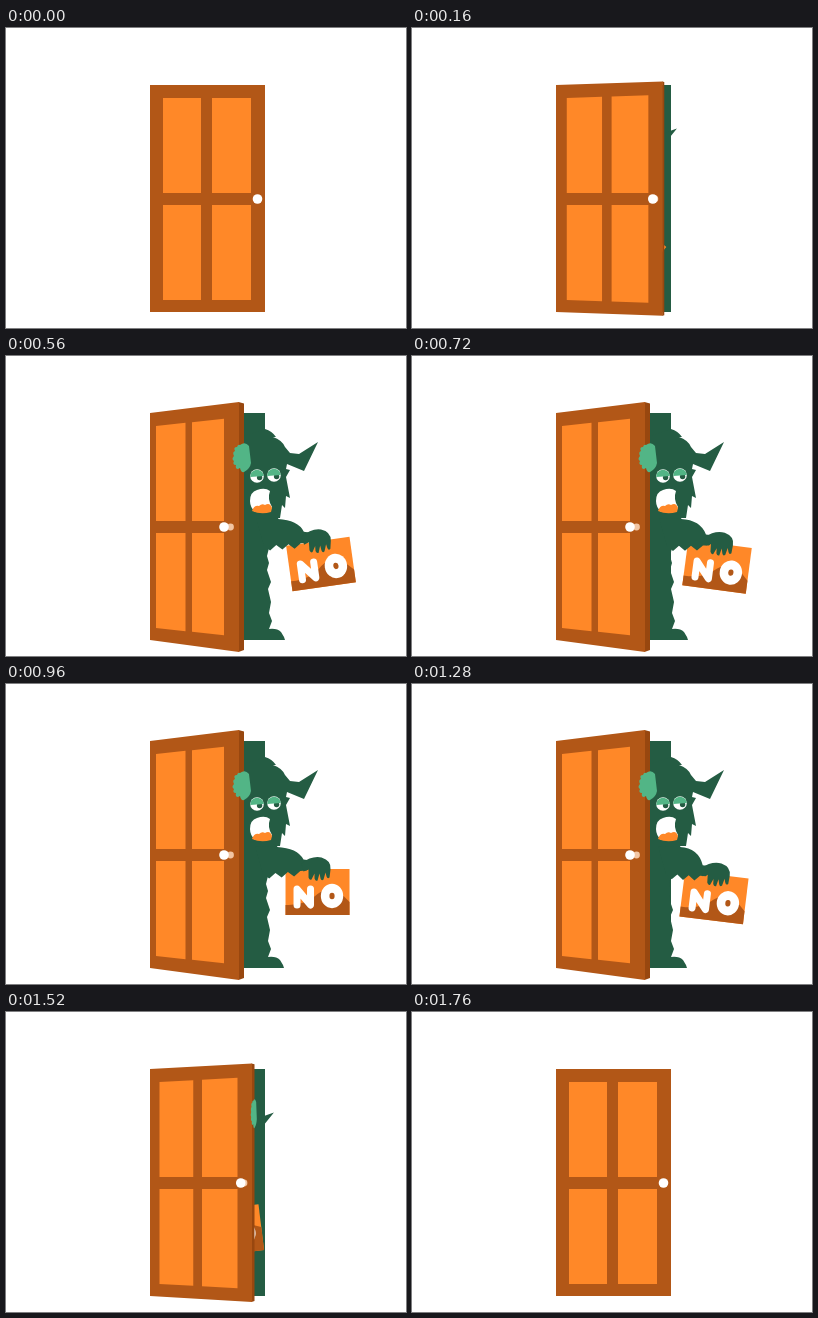
Recreate the animation shown at these times as an HTML page. Size 400 by 300 pixels, loop 1.92 s.

```html
<!DOCTYPE html>
<html lang="en">
<head>
<meta charset="utf-8">
<title>Monster at the door</title>
<style>
  html, body { margin: 0; width: 100%; height: 100%; overflow: hidden; background: #fff; }
  svg { display: block; width: 100%; height: 100%; }
  .fur { fill: #245c43; }
  .mint { fill: #52b586; }
  .wood { fill: #b25717; }
  .panel { fill: #ff8828; }
  .edge { fill: #98470f; }
  .white { fill: #fff; }
  .ink { fill: none; stroke: #fff; stroke-width: 7; stroke-linecap: round; stroke-linejoin: round; }
</style>
</head>
<body>
<svg viewBox="0 0 400 300" role="img" aria-label="A monster holding a NO sign">
  <defs>
    <g id="eye">
      <circle class="white" r="6.8"/>
      <circle class="fur" cx="2.6" cy="1.6" r="2.7"/>
      <path class="mint" d="M-6.8 1A6.8 6.8 0 1 1 6.8 0Z"/>
    </g>
  </defs>
  <rect class="fur" x="144" y="57" width="115" height="227"/>
  <g id="monster">
    <g id="sign">
      <rect class="panel" x="-32" y="-23" width="64" height="46"/>
      <path id="shade" class="wood"/>
      <path class="ink" d="M-20.5 13V-3L-7 13V-3"/>
      <ellipse class="white" cx="14.5" cy="4" rx="11.2" ry="12.2"/>
      <ellipse class="wood" cx="14.5" cy="4" rx="2.6" ry="3.2"/>
    </g>
    <path id="torso" class="fur" d="M236 150L272 152L272 162L276 170L270 188L263 192L261 200L263 207L261 214L265 226L262 233L265 246L263 257L266 265L263 273Q271 272 275 276L278 281L279 284H236Z"/>
    <path id="arm" class="fur"/>
    <path id="paw" class="fur" d="M-16-6Q-6-14 4-12Q14-9 13 0L12 8Q10 10 9 7L8 3L6 10Q4 12 3 9L2 4L0 11Q-2 12-3 9L-3 4L-6 10Q-8 11-9 8L-9 0L-14 2Z"/>
    <g id="head">
      <path class="fur" d="M238 80L259 73Q266 75 270 81L267 81Q276 84 279 91L284 97L293 98L312 86L298 115L281 108L280 113L284 114L280 121L284 142L280 140L279 152L276 149L274 162L238 162Z"/>
      <use href="#eye" x="251" y="120"/>
      <use href="#eye" x="268" y="119"/>
      <g id="mouth">
        <path class="white" d="M244 145Q244 136 251 134Q259 131 264 135Q261 143 266 151L264 156L249 156Q244 151 244 145Z"/>
        <path class="panel" d="M246 155Q248 149 253 150Q256 147 259 149Q264 146 266 152L265 156Q255 159 246 155Z"/>
      </g>
    </g>
  </g>
  <path id="side" class="edge"/>
  <path id="front" class="wood"/>
  <path id="panels" class="panel"/>
  <circle id="knob2" cy="171" r="3.4" fill="#f2c6a4"/>
  <circle id="knob" class="white" cy="171" r="4.8"/>
  <path id="grip" class="mint" d="M1-22Q6-26 10-21L12-4Q11 2 5 5Q2 6 1 1L-1 2Q-4 2-3-2Q-7-2-5-6Q-8-8-5-11Q-7-15-4-16Q-6-20-2-20Q-1-23 1-22Z"/>
</svg>
<script>
const LOOP = 1920, STEP = 80, LAST = 1760;
const $ = id => document.getElementById(id);
const set = (id, name, value) => $(id).setAttribute(name, value);
const clamp = v => Math.max(0, Math.min(1, v));
const mix = (a, b, k) => a + (b - a) * k;
const ease = k => k < .5 ? 2 * k * k : 1 - 2 * (1 - k) ** 2;

// time, head turn, head x, head y, torso x, sign x, sign y, sign turn, mouth, shade lift
const enter = [
  [0, 13, -85, 0, -80, 190, 216, 35, 0, 10],
  [160, 13, -60, 0, -50, 215, 216, 40, 0, 10],
  [320, 8, -7, 2, -2, 273, 213.5, 31, 0, 10],
  [560, 0, 0, 0, 0, 315, 208, -8, 1, 0]
];
const leave = [
  [1280, 0, 0, 0, -4, 302, 213.5, 7, 1, 0],
  [1440, 13, -29, 0, -29, 257, 219, -7, 1, 10],
  [1600, 13, -85, 0, -80, 190, 219, -7, 1, 10],
  [LAST, 13, -85, 0, -80, 190, 219, -7, 0, 10]
];

function between(keys, t) {
  let i = 0;
  while (i < keys.length - 2 && t >= keys[i + 1][0]) i++;
  const a = keys[i], b = keys[i + 1];
  const k = clamp((t - a[0]) / (b[0] - a[0]));
  return a.map((v, j) => mix(v, b[j], k)).slice(1);
}

function wave(t) {
  const c = Math.cos((t - 560) / 480 * 2 * Math.PI);
  const curve = (a, b, d) => a + b * c + d * c * c;
  return [0, 0, 0, 2 * (c - 1),
    curve(308.2, 6.5, .3), curve(208.9, -2.75, 1.83), curve(5.17, -7.5, -5.67), 1, 0];
}

function drawDoor(p) {
  const right = 259 - 26 * p, top = 57 - 11 * p, low = 284 + 12 * p, back = right + 5 * p;
  set('front', 'd', `M144 57L${right} ${top}V${low}L144 284Z`);
  set('side', 'd', `M${right - .5} ${top}L${back} ${top + 1.5 * p}V${low - 2 * p}L${right - .5} ${low}Z`);
  const x0 = 157 - 7 * p;
  const rise = x => .107 * p * (x - x0);
  const pair = (a, b) =>
    `M${a} ${70 - rise(a)}L${b} ${70 - rise(b)}V165H${a}Z` +
    `M${a} 177H${b}V${272 + rise(b)}L${a} ${272 + rise(a)}Z`;
  set('panels', 'd', pair(x0, 195 - 15.5 * p) + pair(206 - 20 * p, 245 - 27 * p));
  const kx = 251.5 - 33.5 * p;
  set('knob', 'cx', kx);
  set('knob2', 'cx', kx + 6.5 * p);
  set('knob2', 'visibility', p > .1 ? 'visible' : 'hidden');
  const reach = clamp((p - .4) / .3);
  set('grip', 'transform', `translate(${back - 5 * reach} 111) scale(${reach} 1)`);
}

function drawArm(dx, x, y) {
  const low = 190 - Math.min(14, Math.max(0, (300 - x) * .9));
  const sx = 258 + dx, ex = x - 11;
  let d = `M${sx - 8} 162L${272 + dx} 163Q${mix(272 + dx, x, .5)} 164 ${x - 14} ${y - 10}L${x} ${y - 8}L${ex} ${y + 1}`;
  for (let i = 1; i <= 6; i++) {
    const k = 1 - i / 7;
    d += `L${mix(sx, ex, k)} ${mix(low, y + 1, k) + (i % 2 ? 0 : 5)}`;
  }
  set('arm', 'd', d + `L${sx} ${low}Z`);
}

function draw(t) {
  const p = t < 640 ? ease(clamp(t / 400)) : 1 - ease(clamp((t - 1280) / 480));
  drawDoor(p);
  set('monster', 'visibility', p > 0 ? 'visible' : 'hidden');

  const pose = t <= 560 ? between(enter, t) : t < 1280 ? wave(t) : between(leave, t);
  const [turn, hx, hy, dx, x, y, tilt, mouth, lift] = pose;
  set('head', 'transform', `translate(${hx} ${hy}) rotate(${turn} 255 150)`);
  set('mouth', 'transform', `translate(255 146) scale(${mouth}) translate(-255 -146)`);
  set('torso', 'transform', `translate(${dx} 0)`);
  set('sign', 'transform', `translate(${x} ${y}) rotate(${tilt})`);
  set('shade', 'd', `M-32 ${13 - lift}Q-12 ${14 - lift} 0 ${2 - lift / 2}Q14-8 24 ${2 - lift / 2}L32 ${10 - lift}V23H-32Z`);

  const a = tilt * Math.PI / 180;
  const wx = x + 22.5 * Math.sin(a), wy = y - 22.5 * Math.cos(a);
  set('paw', 'transform', `translate(${wx} ${wy}) rotate(${tilt / 2})`);
  drawArm(dx, wx, wy);
}

const start = performance.now();
function tick() {
  const t = (performance.now() - start) % LOOP;
  draw(Math.min(LAST, Math.floor(t / STEP) * STEP));
  requestAnimationFrame(tick);
}
tick();
</script>
</body>
</html>
```
